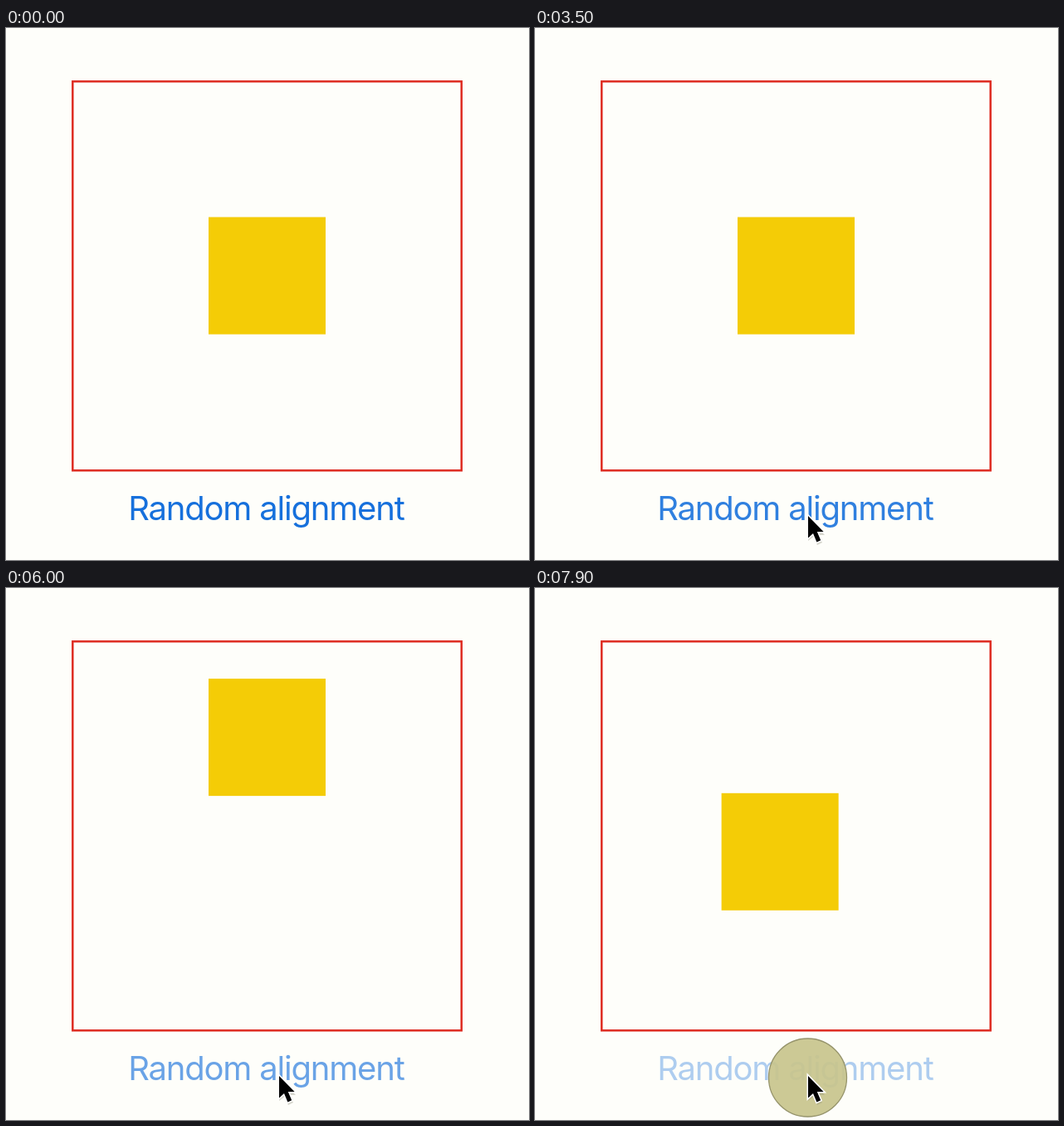
Recreate the animation shown at these times as an HTML page. Size 630 px wide and 640 px high, loop 8000 ms.

```html
<!DOCTYPE html>
<html lang="en">
<head>
<meta charset="utf-8">
<title>Random alignment</title>
<style>
  html, body { margin: 0; width: 100%; height: 100%; overflow: hidden; background: #fefefa; }
  svg { display: block; width: 630px; height: 640px; }
  text { font: 400 40px Inter, "Liberation Sans", sans-serif; letter-spacing: -1.2px; }
</style>
</head>
<body>
<svg viewBox="0 0 630 640">
  <rect width="630" height="640" fill="#fefefa"/>
  <rect id="tile" width="141" height="141" fill="#f4cc06"/>
  <rect x="80.3" y="64.3" width="468.4" height="468" fill="none" stroke="#de2c22" stroke-width="2.5"/>
  <text id="label" x="313.4" y="592" text-anchor="middle" fill="#1670dc">Random alignment</text>
  <circle id="press" cx="328.5" cy="589" r="47" fill="#c9c58d" fill-opacity=".93" stroke="#96946c" stroke-width="1.3"/>
  <g id="cursor">
    <path d="M0 0V28L6.4 23L11 33L17 30L12.5 21H20Z" transform="translate(0 2)" fill="#8c8c78" opacity=".35"/>
    <path d="M0 0V26.5L6 21L10.4 31.4L15.2 29.3L10.8 19H18.6Z" fill="#000" stroke="#fff" stroke-width="3" paint-order="stroke"/>
  </g>
</svg>
<script>
const LOOP = 8000, MOVE = 350, FADE = 420, HOLD = 120;
const X = { left: 80, center: 244, right: 408 };
const Y = { top: 64, center: 227.5, bottom: 391 };

// release time, horizontal and vertical alignment, how long the press mark lingers
const clicks = [
  [2230, "right", "bottom"],
  [2690, "left", "top"],
  [3140, "center", "center"],
  [3660, "left", "top"],
  [4177, "right", "top"],
  [4710, "left", "bottom"],
  [5240, "center", "center"],
  [5771, "center", "top"],
  [6320, "left", "top"],
  [6864, "right", "center"],
  [7345, "center", "center"],
  [7825, "left", "bottom", 110],
];

const [tile, label, press, cursor] =
  ["tile", "label", "press", "cursor"].map(id => document.getElementById(id));
const clamp = v => Math.min(1, Math.max(0, v));
const mix = (a, b, k) => a + (b - a) * k;
const ease = v => { const k = clamp(v); return k * k * (3 - 2 * k); };

function draw(t) {
  let x = X.center, y = Y.center, opacity = 1, pressed = false;
  for (const [at, h, v, linger = 15] of clicks) {
    if (t < at - HOLD) break;
    if (t < at) {
      opacity = 0.2;
    } else {
      const k = ease((t - at) / MOVE);
      x = mix(x, X[h], k);
      y = mix(y, Y[v], k);
      opacity = mix(0.2, 1, clamp((t - at) / FADE));
    }
    pressed = t < at + linger;
  }
  tile.setAttribute("x", x);
  tile.setAttribute("y", y);
  label.setAttribute("opacity", opacity);
  press.setAttribute("visibility", pressed ? "visible" : "hidden");

  const k = 1 - (1 - clamp((t - 1200) / 600)) ** 2;
  cursor.setAttribute("transform", `translate(${mix(475, 329, k)} ${mix(645, 587, k)})`);
}

let start;
function tick(now) {
  start ??= now;
  draw((now - start) % LOOP);
  requestAnimationFrame(tick);
}
draw(0);
requestAnimationFrame(tick);
</script>
</body>
</html>
```
